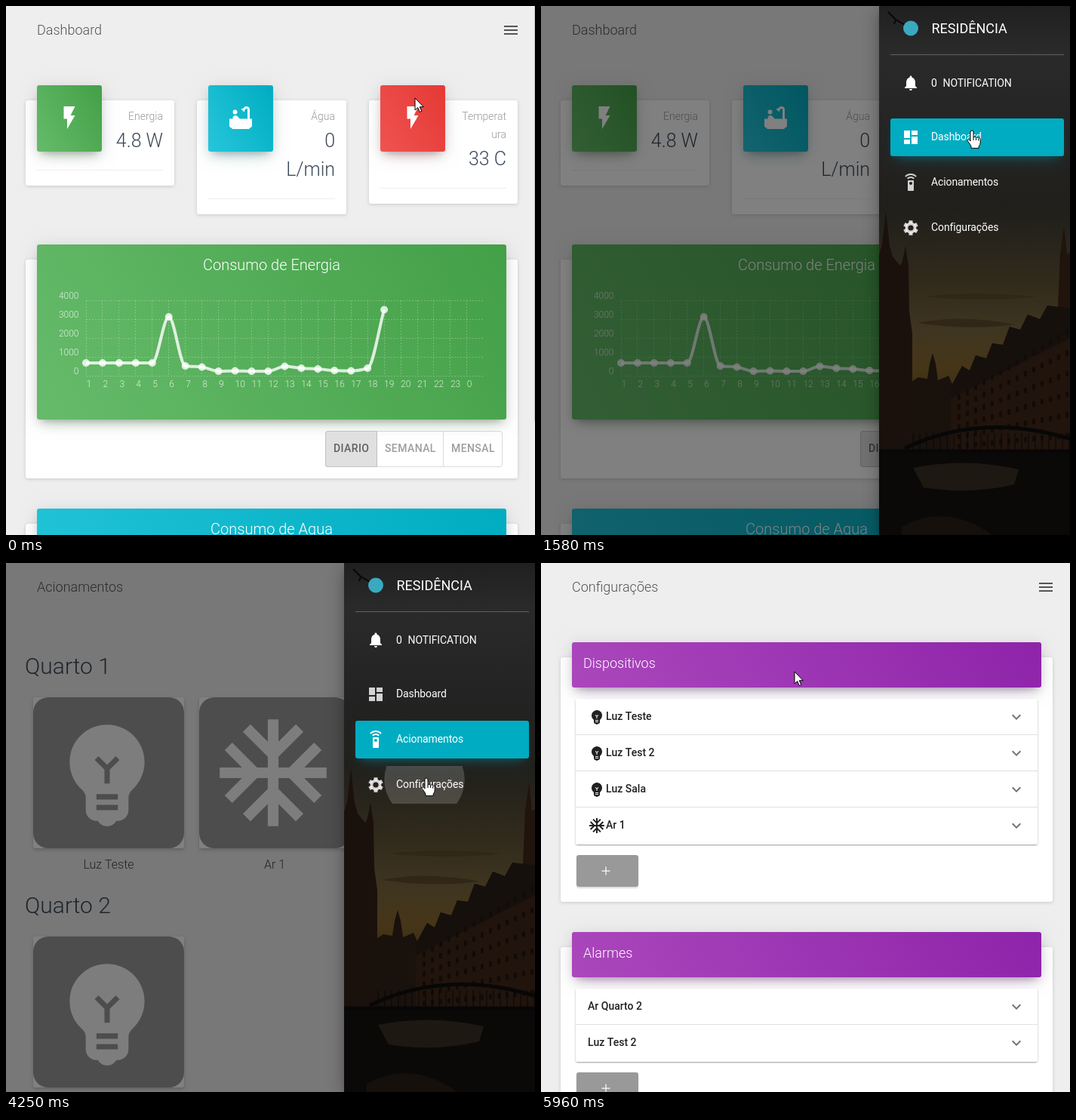
Recreate the animation shown at these times as an HTML page with a canvas. Size 701 px wide and 701 px high, loop 6.33 s.

```html
<!DOCTYPE html>
<html lang="pt">
<head>
<meta charset="utf-8">
<title>Dashboard</title>
<style>
html, body { margin: 0; width: 100%; height: 100%; overflow: hidden; background: #eee; }
canvas { display: block; }
</style>
</head>
<body>
<canvas id="stage" width="701" height="701"></canvas>
<script>
const ctx = document.getElementById('stage').getContext('2d');
const LOOP = 6330, SIZE = 701;

const GREEN = ['#66bb6a', '#43a047'], CYAN = ['#26c6da', '#00acc1'];
const RED = ['#ef5350', '#e53935'], PURPLE = ['#ab47bc', '#8e24aa'];
const INK = '#3c4858';

// Icons on a 24 x 24 grid
const icons = {
  bolt: 'M7 2v11h3v9l7-12h-4l4-8z',
  bath: 'M5 7a2 2 0 1 0 4 0a2 2 0 1 0-4 0zM20 13V4.83C20 3.27 18.73 2 17.17 2c-.75 0-1.47.3-2 .83l-1.25 1.25c-.5-.15-1.1-.1-1.59.24l2.76 2.76c.3-.4.4-1 .25-1.59l1.25-1.25c.5-.5 1.41-.2 1.41.59V13h-6.85l-2.22-2.27c-1.600-1.500-3.930-.5-3.930 1.520V13H2v6c0 1.100.9 2 2 2 0 .55.45 1 1 1h14c.55 0 1-.45 1-1 1.100 0 2-.9 2-2v-6z',
  menu: 'M3 18h18v-2H3zm0-5h18v-2H3zm0-7v2h18V6z',
  bulb: 'M12 3c-.46 0-.93.04-1.4.14-2.76.53-4.96 2.76-5.48 5.52-.48 2.61.48 5.01 2.22 6.56.43.38.66.91.66 1.47V19c0 1.1.9 2 2 2h.28c.35.6.98 1 1.72 1s1.38-.4 1.72-1H14c1.1 0 2-.9 2-2v-2.31c0-.55.22-1.09.64-1.46C18.09 13.95 19 12.08 19 10c0-3.87-3.13-7-7-7zm2 16h-4v-1h4zm0-2h-4v-1h4zm-1.5-5.59V14h-1v-2.59L9.67 9.59l.71-.71L12 10.5l1.62-1.62.71.71z',
  snow: 'M22 11h-4.17l3.24-3.24-1.41-1.42L15 11h-2V9l4.66-4.66-1.42-1.41L13 6.17V2h-2v4.17L7.76 2.93 6.34 4.34 11 9v2H9L4.34 6.34 2.93 7.76 6.17 11H2v2h4.17l-3.24 3.24 1.41 1.42L9 13h2v2l-4.66 4.66 1.42 1.41L11 17.83V22h2v-4.17l3.24 3.24 1.42-1.41L13 15v-2h2l4.66 4.66 1.41-1.42L17.83 13H22z',
  chevron: 'M16.59 8.59L12 13.17 7.41 8.59 6 10l6 6 6-6z',
  bell: 'M12 22c1.1 0 2-.9 2-2h-4c0 1.1.89 2 2 2zm6-6v-5c0-3.07-1.64-5.64-4.5-6.32V4c0-.83-.67-1.5-1.5-1.5s-1.5.67-1.5 1.5v.68C7.63 5.36 6 7.92 6 11v5l-2 2v1h16v-1z',
  tiles: 'M3 13h8V3H3zm0 8h8v-6H3zm10 0h8V11h-8zm0-18v6h8V3z',
  remote: 'M15 9H9c-.55 0-1 .45-1 1v12c0 .55.45 1 1 1h6c.55 0 1-.45 1-1V10c0-.55-.45-1-1-1zm-3 6c-1.1 0-2-.9-2-2s.9-2 2-2 2 .9 2 2-.9 2-2 2zM7.05 6.05l1.41 1.41C9.37 6.56 10.62 6 12 6s2.63.56 3.54 1.46l1.41-1.41C15.68 4.78 13.93 4 12 4s-3.68.78-4.95 2.05zM12 0C8.96 0 6.21 1.23 4.22 3.22l1.41 1.41C7.26 3.01 9.51 2 12 2s4.74 1.01 6.36 2.64l1.41-1.41C17.79 1.23 15.04 0 12 0z',
};
for (const name in icons) icons[name] = new Path2D(icons[name]);
const ARROW = new Path2D('M0 0V16l3.700-3.400L6.300 18.500l2.500-1.100L6.300 11.700H11.300z');
const HAND = new Path2D('M-2 14V2a2 2 0 0 1 4 0V9q2-1.500 3.500.3 2-1 3.200.6 2.500-.5 2.500 2v4q0 3-2 5v2.500H-1v-2.500q-1-2-5-7.500q0-3 4 0z');

const clamp = v => Math.max(0, Math.min(1, v));

// cubic-bezier(x1, 0, x2, 1)
const bezier = (x1, x2) => v => {
  let lo = 0, hi = 1, s;
  v = clamp(v);
  for (let i = 0; i < 24; i++) {
    s = (lo + hi) / 2;
    const x = 3 * (1 - s) ** 2 * s * x1 + 3 * (1 - s) * s * s * x2 + s ** 3;
    if (x < v) lo = s; else hi = s;
  }
  return s * s * (3 - 2 * s);
};
const easeOut = bezier(0, .2), easeInOut = bezier(.4, .2), sharp = bezier(.4, .6);

function rect(x, y, w, h, fill, r = 0) {
  ctx.fillStyle = fill;
  ctx.beginPath();
  ctx.roundRect(x, y, w, h, r);
  ctx.fill();
}

function shadow(x, y, w, h, dy, blur, spread, color) {
  ctx.save();
  ctx.shadowColor = color;
  ctx.shadowBlur = blur;
  ctx.shadowOffsetY = dy;
  rect(x - spread, y - spread, w + 2 * spread, h + 2 * spread, '#fff', 3);
  ctx.restore();
}

function text(s, x, y, size, color, weight = 300, align = 'left', spacing = 0) {
  ctx.font = `${weight} ${size}px Roboto, sans-serif`;
  ctx.letterSpacing = spacing + 'px';
  ctx.textAlign = align;
  ctx.fillStyle = color;
  ctx.fillText(s, x, y);
}

function icon(name, x, y, size, color) {
  ctx.save();
  ctx.translate(x, y);
  ctx.scale(size / 24, size / 24);
  ctx.fillStyle = color;
  ctx.fill(icons[name]);
  ctx.restore();
}

function gear(cx, cy, color) {
  ctx.save();
  ctx.translate(cx, cy);
  ctx.strokeStyle = ctx.fillStyle = color;
  ctx.lineWidth = 3.8;
  ctx.beginPath();
  ctx.arc(0, 0, 5.500, 0, 7);
  ctx.stroke();
  for (let i = 0; i < 6; i++) {
    ctx.rotate(Math.PI / 3);
    ctx.fillRect(-2.500, -9.800, 5, 4);
  }
  ctx.restore();
}

function card(x, y, w, h) {
  shadow(x, y, w, h, 1, 4, 0, 'rgba(0,0,0,.16)');
  rect(x, y, w, h, '#fff', 6);
}

// Raised panel with a 60deg gradient
function panel(x, y, w, h, [from, to]) {
  shadow(x, y, w, h, 4, 20, 0, 'rgba(0,0,0,.14)');
  shadow(x, y, w, h, 12, 20, -10, to + '48');
  shadow(x, y, w, h, 7, 10, -5, 'rgba(0,0,0,.2)');
  const half = (w * .866 + h * .5) / 2, dx = half * .866, dy = half * .5;
  const g = ctx.createLinearGradient(x + w / 2 - dx, y + h / 2 + dy, x + w / 2 + dx, y + h / 2 - dy);
  g.addColorStop(0, from);
  g.addColorStop(1, to);
  rect(x, y, w, h, g, 3);
}

function stat(x, w, h, colors, symbol, label, value) {
  card(x, 125, w, h);
  panel(x + 15, 105, 86, 88, colors);
  icon(symbol, x + 40, 130, 36, '#fff');
  const right = x + w - 15;
  let y = 151;
  for (const line of label) { text(line, right, y, 14, '#999', 300, 'right'); y += 24; }
  y += 12;
  for (const line of value) { text(line, right, y, 25, INK, 300, 'right'); y += 38; }
  rect(x + 15, 125 + h - 21, w - 30, 1, '#eee');
}

function chart() {
  const left = 106, step = 21.95;
  const ys = [473, 473, 473, 473, 473, 412, 477, 478.5, 484, 483.5, 484, 484, 477.5, 480, 481, 483, 483.5, 480, 402.5];
  const px = i => left + i * step;

  ctx.strokeStyle = 'rgba(255,255,255,.25)';
  ctx.lineWidth = 1;
  ctx.setLineDash([2, 2]);
  ctx.beginPath();
  for (let i = 0; i < 5; i++) {
    const y = 490.5 - 25 * i;
    ctx.moveTo(left, y);
    ctx.lineTo(633, y);
    text(i * 1000, 96.5, 488 - 25 * i, 12, 'rgba(255,255,255,.8)', 300, 'right');
  }
  for (let i = 0; i < 24; i++) {
    const x = Math.floor(px(i)) + .5;
    ctx.moveTo(x, 390);
    ctx.lineTo(x, 490);
    text((i + 1) % 24, px(i) + (i < 9 ? 0.500 : 0), 505, 12, 'rgba(255,255,255,.8)');
  }
  ctx.stroke();
  ctx.setLineDash([]);

  // Monotone cubic through the points
  const d = ys.slice(1).map((y, i) => y - ys[i]);
  const slope = ys.map((_, i) => {
    if (i === 0) return d[0];
    if (i === d.length) return d[i - 1];
    const a = d[i - 1], b = d[i];
    return a * b > 0 ? 2 * a * b / (a + b) : 0;
  });
  ctx.strokeStyle = 'rgba(255,255,255,.8)';
  ctx.lineWidth = 4;
  ctx.beginPath();
  ctx.moveTo(px(0), ys[0]);
  for (let i = 0; i < d.length; i++)
    ctx.bezierCurveTo(px(i + 1 / 3), ys[i] + slope[i] / 3, px(i + 2 / 3), ys[i + 1] - slope[i + 1] / 3, px(i + 1), ys[i + 1]);
  ctx.stroke();
  ctx.fillStyle = 'rgba(255,255,255,.8)';
  ys.forEach((y, i) => {
    ctx.beginPath();
    ctx.arc(px(i), y, 5, 0, 7);
    ctx.fill();
  });
}

function dashboard() {
  stat(26, 197, 113, GREEN, 'bolt', ['Energia'], ['4.8 W']);
  stat(253, 198, 151, CYAN, 'bath', ['Água'], ['0', 'L/min']);
  stat(481, 197, 137, RED, 'bolt', ['Temperat', 'ura'], ['33 C']);

  card(26, 336, 652, 290);
  panel(41, 316, 622, 232, GREEN);
  text('Consumo de Energia', 352, 350, 20, '#fff', 300, 'center');
  chart();
  rect(423, 563, 69, 48, '#e0e0e0', [3, 0, 0, 3]);
  ctx.strokeStyle = 'rgba(0,0,0,.14)';
  ctx.lineWidth = 1;
  ctx.beginPath();
  ctx.roundRect(423.5, 563.5, 234, 47, 3);
  for (const x of [491.5, 579.5]) { ctx.moveTo(x, 564); ctx.lineTo(x, 610); }
  ctx.stroke();
  text('DIARIO', 434, 591, 14, '#5f625f', 500, 'left', .4);
  text('SEMANAL', 502, 591, 14, '#9e9e9e', 500, 'left', .4);
  text('MENSAL', 590, 591, 14, '#9e9e9e', 500, 'left', .4);

  card(26, 686, 652, 290);
  panel(41, 666, 622, 232, CYAN);
  text('Consumo de Agua', 352, 700, 20, '#fff', 300, 'center');
}

function tile(x, y, symbol, label) {
  shadow(x + 8, y + 8, 184, 184, 2, 4, 8, 'rgba(0,0,0,.2)');
  rect(x, y, 200, 200, '#999', 20);
  icon(symbol, x + 13, y + 15, 170, '#f8f8f8');
  text(label, x + 100, y + 227, 16, INK, 300, 'center');
}

function switches() {
  text('Quarto 1', 25, 147, 30, INK);
  tile(36, 178, 'bulb', 'Luz Teste');
  tile(256, 178, 'snow', 'Ar 1');
  text('Quarto 2', 25, 464, 30, INK);
  tile(36, 495, 'bulb', 'Luz Teste');
}

function listCard(y, title, rows) {
  const listY = y + 75, listH = rows.length * 48 + 1, buttonY = listY + listH + 14;
  card(26, y + 20, 652, buttonY + 42 - y);
  panel(41, y, 622, 60, PURPLE);
  text(title, 56, y + 34, 18, '#fff');
  shadow(46, listY, 612, listH, 1, 2, 0, 'rgba(0,0,0,.4)');
  rect(46, listY, 612, listH, '#fff', 2);
  rows.forEach(([label, symbol], i) => {
    const top = listY + i * 48;
    if (i) rect(46, top - 1, 612, 1, '#e0e0e0');
    if (symbol) icon(symbol, 62, top + 12, 24, '#212121');
    text(label, symbol ? 86 : 62, top + 28, 14, '#212121', 500);
    icon('chevron', 618, top + 12, 24, '#757575');
  });
  shadow(47, buttonY, 82, 42, 2, 2, 0, 'rgba(0,0,0,.14)');
  rect(47, buttonY, 82, 42, '#999', 3);
  rect(80.5, buttonY + 20.5, 11, 1.2, '#fff');
  rect(85.4, buttonY + 15.500, 1.2, 11, '#fff');
}

function settings() {
  listCard(105, 'Dispositivos', [['Luz Teste', 'bulb'], ['Luz Test 2', 'bulb'], ['Luz Sala', 'bulb'], ['Ar 1', 'snow']]);
  listCard(489, 'Alarmes', [['Ar Quarto 2'], ['Luz Test 2']]);
}

const pages = [
  { title: 'Dashboard', draw: dashboard, at: -1000 },
  { title: 'Acionamentos', draw: switches, at: 2900 },
  { title: 'Configurações', draw: settings, at: 4340 },
];
const LOAD = 170;

function drawPage(t) {
  rect(0, 0, SIZE, SIZE, '#eee');
  const page = pages.findLast(p => t >= p.at);
  if (t >= page.at + LOAD) page.draw();
  text(page.title, 41, 38, 18, '#555');
  icon('menu', 657, 20, 24, '#555');
  if (t < 631) rect(700, 0, 1, 551, '#c1c1c1');
}

function shape(color, d) {
  ctx.fillStyle = color;
  ctx.fill(new Path2D(d));
}

// Dusk canal behind the menu
function backdropPhoto() {
  const sky = ctx.createLinearGradient(0, 0, 0, 600);
  [[0, '#202021'], [.1, '#2a2a2b'], [.3, '#232323'], [.45, '#201f1b'], [.6, '#302a1c'], [.72, '#3f3520'], [.8, '#463618'], [1, '#1c140d']]
    .forEach(stop => sky.addColorStop(...stop));
  rect(0, 0, 260, SIZE, sky);
  shape('#302718', 'M50 420q60-12 130 2q-60 8-130-2zM60 385q60-8 150 0q-70 8-150 0z');
  shape('#19110c', 'M40 500l12-8 12 2 3-20 4-14 4 14 3 22 14-6 8 18V600H40z');
  shape('#1b110c', 'M0 330l4-14 5-44 5 46 4 14 10 12 3-6 4-20 4 26 1 60 4 30V600H0z');
  shape('#20140d', 'M95 505l15-28 10 6 8-20 14 4 8-20 14 2 9-24 14 4 10-20 16 6 10-18 14 2 3-70 5-38 4 38 11-8V600H95z');
  shape('#15100c', 'M95 505l15-28 10 6 8-20 14 4 8-20 14 2 9-24 14 4 10-20 16 6 10-18 37 4v36L95 520z');
  for (let row = 0; row < 6; row++)
    for (let col = 0; col < 14; col++) {
      const x = 104 + col * 11;
      rect(x, 515 + row * 13 - (col * (6 - row)) * 1.1, 4, 7, '#120b08');
    }
  rect(0, 590, 260, 111, '#0b0908');
  shape('#1d1812', 'M45 612q70-14 140 2l-6 20q-60 14-120 4z');
  shape('#15100c', 'M30 690q60-32 120 11H30z');
  ctx.strokeStyle = '#080707';
  ctx.lineWidth = 5;
  ctx.stroke(new Path2D('M34 586Q140 536 260 576M0 590H260'));
  ctx.lineWidth = 1;
  ctx.beginPath();
  for (let x = 45; x < 260; x += 9) { ctx.moveTo(x, 566); ctx.lineTo(x, 590); }
  ctx.stroke();
  ctx.lineWidth = 2;
  ctx.stroke(new Path2D('M12 8l10 10 14 8M22 18l-2 6'));
}

const menu = ['tiles', 'remote', 'gear'];
const ripples = [
  { item: 1, x: 105, y: 228, start: 2640, end: 2840 },
  { item: 2, x: 106.5, y: 287, start: 4085, end: 4285 },
];

function drawRipple({ x, y, start, end }, top, t) {
  if (t < start || t > end + 550) return;
  const grow = easeInOut((t - start) / 550), fade = 1 - easeInOut((t - end) / 550);
  ctx.save();
  ctx.beginPath();
  ctx.roundRect(15, top, 230, 50, 3);
  ctx.clip();
  ctx.fillStyle = `rgba(255,255,255,${(.1 + .2 * grow) * fade})`;
  ctx.beginPath();
  ctx.arc(x, y, 143 * grow, 0, 7);
  ctx.fill();
  ctx.restore();
}

function drawMenu(x, t) {
  ctx.save();
  ctx.translate(x, 0);
  shadow(0, 0, 260, SIZE, 4, 25, 0, 'rgba(0,0,0,.3)');
  shadow(0, 0, 260, SIZE, 8, 10, -3, 'rgba(0,0,0,.25)');
  backdropPhoto();

  ctx.fillStyle = '#3aa9c0';
  ctx.beginPath();
  ctx.arc(42, 29.5, 10, 0, 7);
  ctx.fill();
  text('RESIDÊNCIA', 69.500, 36, 18, '#fff', 400);
  rect(15, 64, 230, 1, 'rgba(180,180,180,.4)');
  icon('bell', 30, 90, 24, '#fff');
  text('0', 69, 107, 14, '#fff', 400);
  text('NOTIFICATION', 84.500, 107, 14, '#fff', 400, 'left', -.1);

  menu.forEach((symbol, i) => {
    const top = 149 + i * 60, next = pages[i + 1];
    const active = clamp((t - pages[i].at) / 300) - (next ? clamp((t - next.at) / 300) : 0);
    if (active > 0) {
      ctx.globalAlpha = active;
      // Glow is drawn outside the item only, so that the fill can blend
      ctx.save();
      ctx.beginPath();
      ctx.rect(0, 0, 260, SIZE);
      ctx.roundRect(15, top, 230, 50, 3);
      ctx.clip('evenodd');
      shadow(15, top, 230, 50, 12, 20, -10, 'rgba(0,172,193,.28)');
      shadow(15, top, 230, 50, 7, 8, -5, 'rgba(0,172,193,.2)');
      ctx.restore();
      rect(15, top, 230, 50, '#00acc1', 3);
      ctx.globalAlpha = 1;
    }
    for (const r of ripples) if (r.item === i) drawRipple(r, top, t);
    const tint = `rgba(255,255,255,${.8 + .2 * active})`;
    if (symbol === 'gear') gear(42, top + 25, tint);
    else icon(symbol, 30, top + 13, 24, tint);
    text(pages[i].title, 69, top + 29, 14, '#fff', 400, 'left', -.1);
  });
  ctx.restore();
}

// Pointer moves: start, end, x, y
const moves = [
  [0, 0, 542, 122], [0, 310, 674, 42], [740, 1120, 648, 58], [1130, 1580, 571, 165],
  [2380, 2630, 557, 222], [3630, 4060, 557, 285], [4910, 5380, 336, 144],
];

function drawPointer(t) {
  let [, , x, y] = moves[0];
  for (const [start, end, tx, ty] of moves.slice(1)) {
    const p = clamp((t - start) / (end - start)), k = p * p * (3 - 2 * p);
    x += (tx - x) * k;
    y += (ty - y) * k;
  }
  const overItem = t > 1130 && x > 463 && y > 149 && y < 319 && (y - 149) % 60 < 50;
  const path = overItem ? HAND : ARROW;
  ctx.save();
  ctx.translate(x, y);
  ctx.fillStyle = '#fff';
  ctx.strokeStyle = '#000';
  ctx.lineWidth = 1;
  ctx.fill(path);
  ctx.stroke(path);
  if (overItem) ctx.stroke(new Path2D('M2 9v4M5.500 10v3M8.700 11v2.500'));
  ctx.restore();
}

const OPEN = 631, CLOSE = 5418;

function frame() {
  const t = performance.now() % LOOP;
  drawPage(t);
  const closing = t >= CLOSE;
  const shown = closing ? 1 - sharp((t - CLOSE) / 195) : easeOut((t - OPEN) / 225);
  const dim = closing ? 1 - easeInOut((t - CLOSE) / 195) : easeInOut((t - OPEN) / 225);
  if (t > OPEN && t < CLOSE + 195) {
    rect(0, 0, SIZE, SIZE, `rgba(0,0,0,${.5 * dim})`);
    drawMenu(708 - 260 * shown, t);
  }
  drawPointer(t);
  requestAnimationFrame(frame);
}
frame();
</script>
</body>
</html>
```
